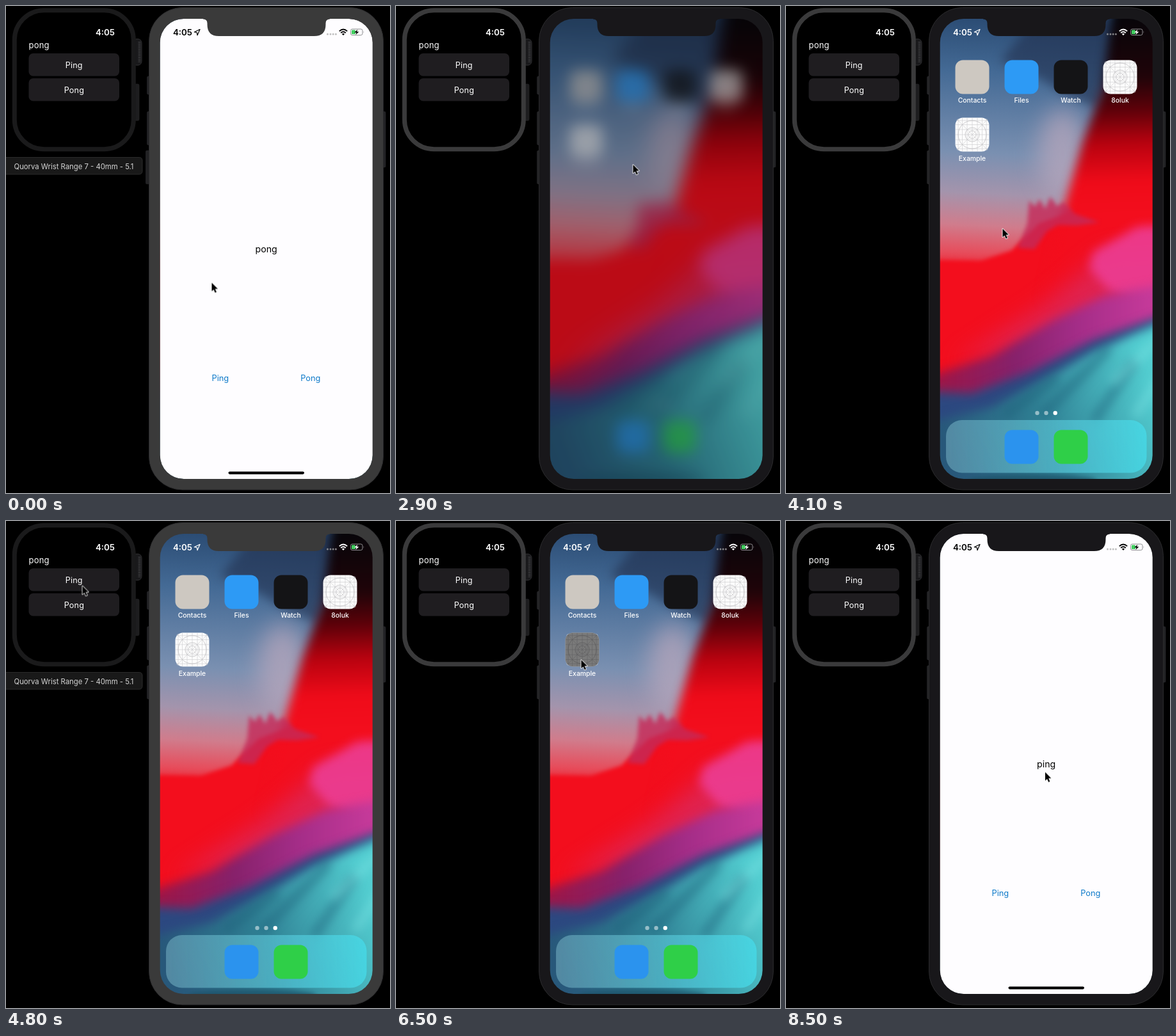
These frames come from a looping animation (600x761 px, 8.8 s). An HTML page:

```html
<!DOCTYPE html>
<html lang="en">
<head>
<meta charset="utf-8">
<title>Ping pong</title>
<style>
html, body { margin: 0; width: 100%; height: 100%; overflow: hidden; background: #000; }
svg { display: block; width: 100vw; height: 100vh; }
text { font-family: Inter, "Open Sans", sans-serif; fill: #fff; }
.mid { text-anchor: middle; }
.time { font-weight: 600; font-size: 13.3px; fill: currentColor; }
.watch-text { font-size: 12.6px; letter-spacing: .2px; }
.label { font-size: 10.4px; font-weight: 500; text-anchor: middle; }
.link { font-size: 12.8px; fill: #0e7ac9; text-anchor: middle; }
.haze { filter: blur(18px); }
.soft { filter: blur(8px); }
.crisp { filter: blur(3px); }

/* One loop for every moving part */
#phone, #watch, #tip, #knob, #home, #icons, #dock, #white-status, #card, #app, #title,
#app-status, #bar, #launch, #press, #pong, #ping, #cursor { animation: 8.8s linear infinite; }

/* Hard changes */
#phone { --a: #3a3a3a; --b: #18171a; animation-name: focus; }
#watch { --a: #1a1a1b; --b: #3a3a3b; animation-name: focus; }
#phone, #watch, #tip, #knob, #press, #pong, #ping { animation-timing-function: steps(1, end); }
@keyframes focus {
  0%, 53.4% { color: var(--a); }
  7.95%, 72.72%, 100% { color: var(--b); }
}
#tip { animation-name: tip; }
@keyframes tip {
  0%, 49.99% { opacity: 1; }
  7.95%, 72.72%, 100% { opacity: 0; }
}
#knob { animation-name: knob; }
@keyframes knob {
  0% { transform: translateX(-2px); }
  3.4%, 100% { transform: none; }
}
#press { animation-name: press; }
@keyframes press {
  0%, 75%, 100% { opacity: 0; }
  73.8% { opacity: .52; }
}
#pong { animation-name: pong; }
@keyframes pong { 0% { opacity: 1; } 60%, 100% { opacity: 0; } }
#ping { animation-name: ping; }
@keyframes ping { 0% { opacity: 0; } 60%, 100% { opacity: 1; } }

/* Home screen */
#home { animation-name: home; }
@keyframes home {
  0%, 33% { filter: blur(11px) brightness(.77); animation-timing-function: ease-in-out; }
  37.8%, 100% { filter: blur(0px) brightness(1); }
}
#icons { transform-origin: 406.5px 380px; animation-name: icons; }
@keyframes icons {
  0%, 33% { transform: scale(.948); opacity: .68; animation-timing-function: ease-out; }
  37.8%, 100% { transform: none; opacity: 1; }
}
#dock { animation-name: dock; }
@keyframes dock { 0%, 33% { opacity: 0; } 37.8%, 100% { opacity: 1; } }
#white-status { color: #fff; animation-name: white-status; }
@keyframes white-status {
  0%, 33.5% { opacity: 0; }
  37.8%, 75% { opacity: 1; }
  78%, 100% { opacity: 0; }
}

/* App, switcher card and relaunch */
#card { animation-name: card; }
@keyframes card {
  0%, 26.1% { transform: none; animation-timing-function: ease-in; }
  29.5% { transform: translateY(-190px); }
  31.8% { transform: translateY(-700px); animation-timing-function: steps(1, end); }
  81.8%, 100% { transform: none; }
}
#app { animation-name: app; }
@keyframes app {
  0%, 21% { transform: translate(0, 0) scale(1); animation-timing-function: ease-out; }
  23.7% { transform: translate(121.1px, 106.6px) scale(.702); animation-timing-function: steps(1, end); }
  81.8%, 100% { transform: translate(0, 0) scale(1); }
}
#title { animation-name: title; }
@keyframes title {
  0%, 21.6% { opacity: 0; }
  23.4%, 27.5% { opacity: 1; }
  30%, 100% { opacity: 0; }
}
#app-status { color: #000; animation-name: app-status; }
@keyframes app-status {
  0%, 21% { opacity: 1; }
  23.5% { opacity: .13; animation-timing-function: steps(1, end); }
  81.8%, 100% { opacity: 1; }
}
#bar { animation-name: bar; }
@keyframes bar {
  0%, 21% { opacity: 1; }
  23.5% { opacity: .65; animation-timing-function: steps(1, end); }
  81.8%, 100% { opacity: 1; }
}
#launch { fill: #fefdff; animation-name: launch; }
@keyframes launch {
  0%, 75% {
    x: 264.5px; y: 174.5px; width: 53px; height: 53px; rx: 12px; opacity: 0;
    animation-timing-function: cubic-bezier(.3, .6, .3, 1);
  }
  76.5% { opacity: 1; }
  80.7%, 100% { x: 240.5px; y: 20px; width: 332.5px; height: 719px; rx: 37px; opacity: 1; }
}

#cursor { animation-name: cursor; }
@keyframes cursor {
  0% { transform: translate(321.5px, 432.5px); animation-timing-function: steps(1, end); }
  3.4%, 26.1% { transform: translate(375px, 460px); animation-timing-function: ease-in-out; }
  30.7%, 37.5% { transform: translate(370.5px, 248px); animation-timing-function: ease-in-out; }
  42%, 46.6% { transform: translate(338.5px, 348px); animation-timing-function: ease-in-out; }
  51.5%, 63.6% { transform: translate(119.5px, 101.5px); animation-timing-function: ease-in-out; }
  71.6% { transform: translate(289.5px, 217px); }
  96.58% { transform: translate(289.5px, 217px); animation-timing-function: steps(1, end); }
  96.59%, 100% { transform: translate(405px, 392.5px); }
}
</style>
</head>
<body>
<svg viewBox="0 0 600 761" preserveAspectRatio="none">
  <defs>
    <clipPath id="screen"><rect x="240.7" y="20" width="332" height="719" rx="37"/></clipPath>
    <linearGradient id="sky" gradientUnits="userSpaceOnUse" x1="320" y1="20" x2="300" y2="440">
      <stop offset="0" stop-color="#2b4c74"/>
      <stop offset=".2" stop-color="#446a95"/>
      <stop offset=".5" stop-color="#7a90b1"/>
      <stop offset=".65" stop-color="#a494ac"/>
      <stop offset=".77" stop-color="#d07c8c"/>
      <stop offset=".87" stop-color="#e64e5d"/>
      <stop offset=".95" stop-color="#f01c2b"/>
    </linearGradient>
    <linearGradient id="ember" gradientUnits="userSpaceOnUse" x1="500" y1="20" x2="510" y2="330">
      <stop offset="0" stop-color="#070509"/>
      <stop offset=".3" stop-color="#1f0409"/>
      <stop offset=".46" stop-color="#5c0109"/>
      <stop offset=".63" stop-color="#b8020f"/>
      <stop offset=".82" stop-color="#ef0b19"/>
      <stop offset="1" stop-color="#f30e1d"/>
    </linearGradient>
    <linearGradient id="plum" gradientUnits="userSpaceOnUse" x1="240" y1="0" x2="573" y2="0">
      <stop offset="0" stop-color="#9c1648"/>
      <stop offset=".35" stop-color="#86216b"/>
      <stop offset=".65" stop-color="#a42d88"/>
      <stop offset="1" stop-color="#c63a9a"/>
    </linearGradient>
    <linearGradient id="sea" gradientUnits="userSpaceOnUse" x1="250" y1="680" x2="560" y2="560">
      <stop offset="0" stop-color="#28587a"/>
      <stop offset=".45" stop-color="#2f7f93"/>
      <stop offset="1" stop-color="#52cdd0"/>
    </linearGradient>
    <linearGradient id="glass">
      <stop offset="0" stop-color="#6aa3b8" stop-opacity=".65"/>
      <stop offset="1" stop-color="#46dcea" stop-opacity=".75"/>
    </linearGradient>

    <rect id="tile" x="-26.5" y="-26.5" width="53" height="53" rx="12"/>
    <g id="grid">
      <use href="#tile" fill="#fcfcfc"/>
      <path d="M-24 -24L24 24M24 -24L-24 24M0 -26V26M-26 0H26M-15.5 -26V26M15.5 -26V26M-26 -15.5H26M-26 15.5H26M-8 -26V26M8 -26V26M-26 -8H26M-26 8H26M-22 -25V25M22 -25V25M-25 -22H25M-25 22H25" stroke="#cccbcd" stroke-width=".6"/>
      <g fill="none" stroke="#b9b8bb" stroke-width=".7">
        <circle r="6"/><circle r="11"/><circle r="22"/>
      </g>
    </g>

    <g id="status">
      <text class="time" x="261" y="45.5">4:05</text>
      <path d="M303 36.5L294.3 40.7L298.3 41.5L299 45.7Z" fill="none" stroke="currentColor" stroke-width="1.2" stroke-linejoin="round"/>
      <g fill="#aaa" opacity=".75">
        <circle cx="502.5" cy="44" r="1.5"/><circle cx="507" cy="44" r="1.5"/>
        <circle cx="511.2" cy="44" r="1.5"/><circle cx="515.4" cy="44" r="1.5"/>
      </g>
      <g fill="none" stroke="currentColor" stroke-width="1.9">
        <path d="M520.8 39.4Q527 33.8 533.2 39.4M523.2 42Q527 38.6 530.8 42"/>
      </g>
      <path d="M524.9 43.7Q527 42 529.1 43.7L527 46Z" fill="currentColor"/>
      <rect x="538.5" y="36" width="18.5" height="9.6" rx="2.6" fill="none" stroke="#8f8f92"/>
      <rect x="540" y="37.5" width="6" height="6.6" rx="1.2" fill="#42cf60"/>
      <path d="M549.3 36.8L544.3 41.4H547.4L546.4 45L551.4 40.3H548.3Z" fill="currentColor"/>
      <path d="M558.6 39.3Q560 40.8 558.6 42.3Z" fill="#8f8f92"/>
    </g>
  </defs>

  <rect width="600" height="761"/>

  <g id="watch">
    <rect x="200" y="122" width="8" height="57" rx="2" fill="#1d1d1f" stroke="#29292b" stroke-width=".6"/>
    <rect x="198" y="51.5" width="14" height="41" rx="6" fill="#19191b" stroke="#303032"/>
    <path d="M208.5 56V88" stroke="#444447" stroke-width="4" stroke-dasharray="1 1.4"/>
    <rect x="13.3" y="6.8" width="186" height="217" rx="46" fill="#000" stroke="currentColor" stroke-width="7"/>
    <text class="time" x="140" y="46" style="color:#fff">4:05</text>
    <text class="watch-text" x="35.5" y="66" style="font-size:13px">pong</text>
    <g fill="#1f1d20">
      <rect x="35.5" y="74" width="141.5" height="35.5" rx="7"/>
      <rect x="35.5" y="113" width="141.5" height="35.5" rx="7"/>
    </g>
    <text class="watch-text mid" x="106.2" y="96.5">Ping</text>
    <text class="watch-text mid" x="106.4" y="135.5">Pong</text>
  </g>

  <g id="tip">
    <rect x="-8" y="236.5" width="221" height="26.5" rx="4.5" fill="#191919" stroke="#2a2a2a"/>
    <text class="mid" x="106" y="254.7" font-size="11.3" style="fill:#d6d6d6">Quorva Wrist Range 7 - 40mm - 5.1</text>
  </g>

  <g id="phone">
    <g fill="#222224" stroke="#2d2d2f" stroke-width=".6">
      <rect x="220.5" y="110" width="6" height="28" rx="1.5"/>
      <rect x="220.5" y="165" width="6" height="52" rx="1.5"/>
      <rect id="knob" x="220.5" y="226" width="6" height="52" rx="1.5"/>
      <rect x="586" y="165" width="7" height="87" rx="1.5"/>
    </g>
    <rect x="223.5" y="2.5" width="366" height="753.5" rx="52" fill="currentColor" stroke="#2b2b2d"/>

    <g clip-path="url(#screen)">
      <g id="home">
        <g>
          <rect x="180" y="-40" width="460" height="840" fill="url(#sky)"/>
          <ellipse class="haze" cx="432" cy="232" rx="38" ry="72" fill="#b3a5bb" opacity=".8"/>
          <path class="soft" d="M390 20H545L486 158L440 140L395 112L335 85Z" fill="#22304e" opacity=".6"/>
          <path class="crisp" d="M180 408L240 397L305 398L352 382L395 340L450 320H640V640H180Z" fill="#f30e1d"/>
          <path class="soft" d="M516 -40H640V460H400L437 305L463 215L494 130Z" fill="url(#ember)"/>
          <path class="haze" d="M260 560L400 470L500 385L640 380V470L420 530Z" fill="#d92a62" opacity=".75"/>
          <path class="soft" d="M640 338L548 345L520 362L480 385L474 410L505 445L640 500Z" fill="#ec3d93" opacity=".9"/>
          <path class="crisp" d="M362 378L377 340L380 304L389 314L396 302L405 317L413 298L424 313L434 306L452 325L490 338L455 343L425 342L408 352L388 380Z" fill="#c42a59" opacity=".8"/>
          <path class="soft" d="M180 592L320 548L420 490L500 452L640 425V560L300 640H180Z" fill="url(#plum)"/>
          <path class="soft" d="M180 600L290 605L380 572L480 522L640 465V640L180 760Z" fill="#2c4880"/>
          <path class="soft" d="M180 660L320 628L400 585L480 540L640 470V820H180Z" fill="url(#sea)"/>
          <path class="soft" d="M505 535L400 640M545 555L480 650M425 580L340 640" stroke="#1c5d77" stroke-width="14" opacity=".5"/>
          <path class="soft" d="M600 505L510 590M600 560L545 640" stroke="#7ee6e6" stroke-width="12" opacity=".5"/>
          <ellipse class="crisp" cx="385" cy="741" rx="100" ry="9" fill="#1b5066" opacity=".7"/>
        </g>
        <g id="icons">
          <rect id="dock" x="250" y="647" width="313.5" height="82.5" rx="25" fill="url(#glass)"/>
          <use href="#tile" x="291" y="111" fill="#cdc8c1"/>
          <use href="#tile" x="368" y="111" fill="#2d9af5"/>
          <use href="#tile" x="445" y="111" fill="#141416"/>
          <use href="#grid" x="522" y="111"/>
          <use href="#grid" x="291" y="201"/>
          <use id="press" href="#tile" x="291" y="201"/>
          <use href="#tile" x="368" y="689" fill="#2b93ee"/>
          <use href="#tile" x="445" y="689" fill="#2fcf48"/>
          <text class="label" x="291" y="151.3">Contacts</text>
          <text class="label" x="368" y="151.3">Files</text>
          <text class="label" x="445" y="151.3">Watch</text>
          <text class="label" x="522" y="151.3">8oluk</text>
          <text class="label" x="291" y="241.5">Example</text>
          <g fill="#fff">
            <circle cx="392.5" cy="636" r="3.2" opacity=".5"/>
            <circle cx="406.5" cy="636" r="3.2" opacity=".5"/>
            <circle cx="420.7" cy="636" r="3.2"/>
          </g>
        </g>
      </g>
      <use id="white-status" href="#status"/>
      <rect id="launch"/>

      <g id="card">
        <g id="title">
          <use href="#grid" transform="translate(322.5 101) scale(.44)"/>
          <text x="341.5" y="106" font-size="13.1" font-weight="600">Example</text>
        </g>
        <g id="app">
          <rect x="240.5" y="20" width="332.5" height="719" rx="37" fill="#fefdff"/>
          <use id="app-status" href="#status"/>
          <g class="mid" font-size="14.2">
            <text id="pong" x="406.7" y="385" style="fill:#000">pong</text>
            <text id="ping" x="406.7" y="385" style="fill:#000">ping</text>
          </g>
          <text class="link" x="334.8" y="586">Ping</text>
          <text class="link" x="475.8" y="586">Pong</text>
          <rect id="bar" x="347.5" y="727.5" width="118.5" height="4.2" rx="2.1"/>
        </g>
      </g>
    </g>
    <path d="M308 19H506V20.5Q499.5 20.5 499.5 27V29Q499.5 47 481.5 47H332.5Q314.5 47 314.5 29V27Q314.5 20.5 308 20.5Z" fill="currentColor"/>
  </g>

  <path id="cursor" d="M0 0V13.2L3 10.4L5.2 15.5L7.4 14.6L5.2 9.6H9.4Z" stroke="#fff" stroke-width="1.6" paint-order="stroke" stroke-linejoin="round"/>
</svg>
</body>
</html>
```
